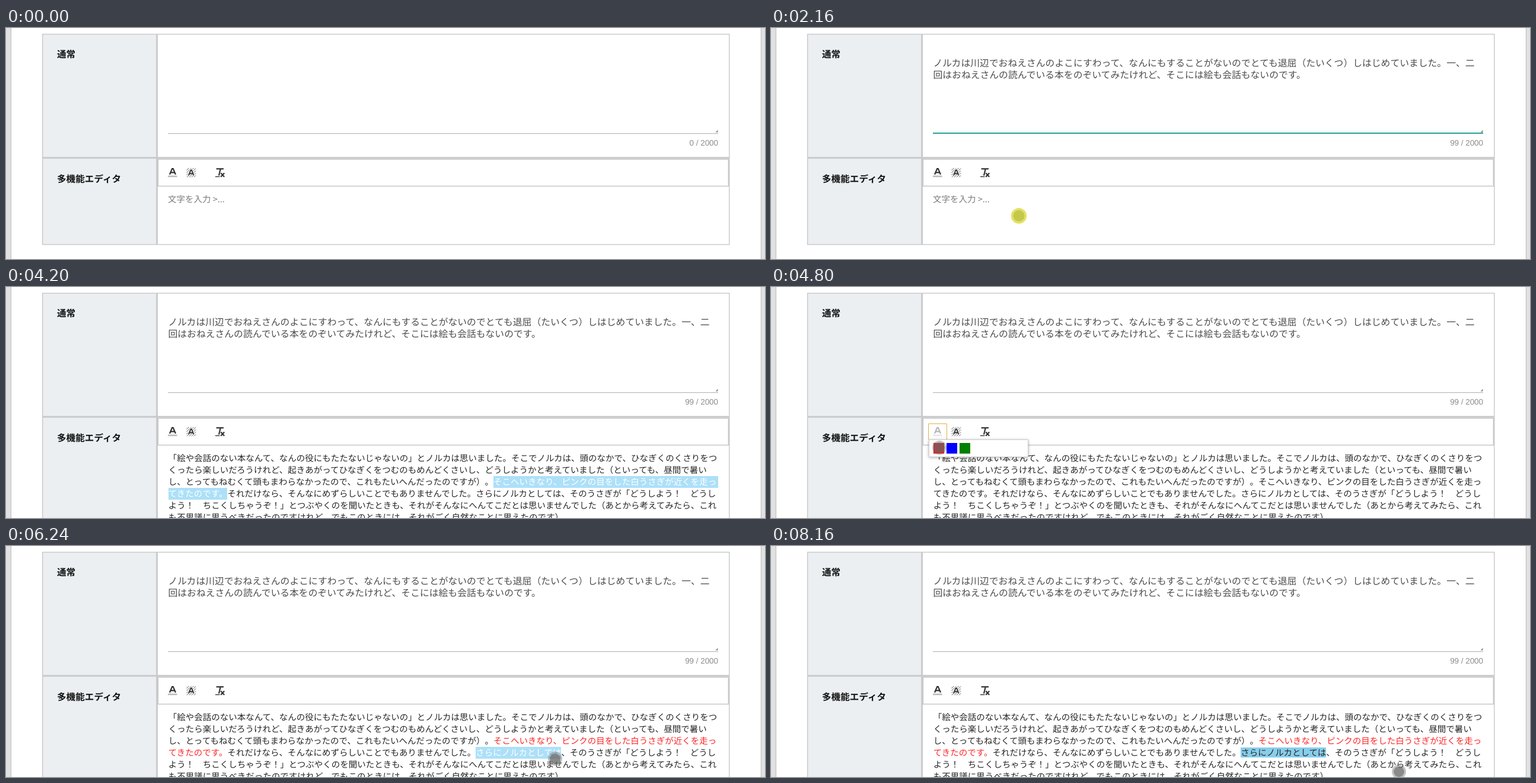
These frames come from a looping animation (1280 px wide and 391 px high, 8.28 s). An HTML page:

```html
<!DOCTYPE html>
<html lang="ja">
<head>
<meta charset="utf-8">
<title>Editor demo</title>
<style>
html, body { margin: 0; width: 100%; height: 100%; overflow: hidden; background: #fff; }
#stage {
  position: relative; width: 1280px; height: 391px; overflow: hidden;
  font-family: "Noto Sans CJK JP", "Noto Sans CJK", sans-serif; line-height: 20px;
  white-space: pre; text-spacing-trim: space-all; text-rendering: geometricPrecision;
}
#stage > * { position: absolute; }
svg, .popup { left: 0; top: 0; }
h2 { left: 86px; margin: 0; font-size: 15.6px; line-height: 20px; font-weight: 700; color: #111; }
#area { left: 273.5px; top: 49px; font-size: 15.8px; font-weight: 300; color: #4c4c4c; }
#count { right: 79px; top: 185px; font: 13.4px/20px "Liberation Sans", Arial, sans-serif; color: #8c8c8c; }
#hint, #doc { left: 273.8px; top: 280px; font-size: 14.51px; font-weight: 300; }
#hint { left: 273px; color: #7a7a7a; }
#doc { color: #262626; }
.red { color: #ff2424; }
.mark { background: linear-gradient(#87ceeb, #87ceeb) center / 100% 17px no-repeat; }
.sel { color: #fff; background: linear-gradient(#ade0f8, #ade0f8) center / 100% 20px no-repeat; }
.full { padding-right: 3px; }
.caret { width: 1px; height: 17px; background: #111; }
.popup * { position: absolute; box-sizing: border-box; }
.pick { top: 230.5px; width: 32px; height: 28px; border: 1.5px solid #e2ad45; border-radius: 1px; }
.menu { top: 258px; width: 168px; height: 30px; border: 1px solid #ccc; background: #fff;
  box-shadow: 0 1px 5px rgba(0,0,0,.3); }
.menu i { top: 5px; width: 18px; height: 18px; }
#dot { width: 18px; height: 18px; margin: -12px; border: 3px solid rgba(120,120,120,.45);
  border-radius: 50%; background: rgba(105,105,105,.78); background-clip: padding-box; }
#dot.click { width: 20px; height: 20px; margin: -13px; border-color: #e3e160; background-color: #c6c84b;
  box-shadow: 0 0 2px #eeee90; }
#pan { left: 874px; top: 359px; }
</style>
</head>
<body>
<div id="stage">
  <svg width="1280" height="391" viewBox="0 0 1280 391">
    <path fill="#e1e1e1" d="M0 0h8v391H0zM1274 0h6v391h-6z"/>
    <path stroke="#c6c6c6" stroke-width="1.4" d="M8.4 0v391M1273.5 0v391"/>
    <rect class="tall" x="61.6" y="10.5" width="193" height="356" fill="#ebeff2"/>
    <rect class="tall" x="61.6" y="10.5" width="1158.2" height="356" fill="none" stroke="#c6c7c9" stroke-width="1.4"/>
    <rect class="tall" x="253.2" y="10.5" width="2.8" height="356" fill="#c8cacc"/>
    <path stroke="#c8cacc" stroke-width="3" d="M61 219.8h1159"/>
    <rect x="256.4" y="222.2" width="962" height="45.4" fill="#fff" stroke="#c6c6c6" stroke-width="1.5"/>
    <path stroke="#bbb" stroke-width="1.3" d="M273 178.6h928"/>
    <path fill="#888" d="M1200.5 172.5v4h-4z"/>
    <path id="focus" stroke="#26a69a" stroke-width="2"/>
    <g id="iconA">
      <path fill="none" stroke="#333" stroke-width="2.2" d="M276 248l4.2-10h1.6l4.2 10M277.8 244.6h6.4"/>
      <path fill="#bbb" d="M273 249.8h15.6v2.6H273z"/>
    </g>
    <g id="iconB">
      <path fill="none" stroke="#555" stroke-width="1" d="M304.5 241l4-4M304.5 245l8-8M304.5 249l12-12M305 252.5l15-15M309 252.5l11-11M313 252.5l7-7M317 252.5l3-3"/>
      <path fill="none" stroke="#fff" stroke-width="4" d="M308 249.5l3.6-9h1.4l3.6 9"/>
      <path fill="none" stroke="#333" stroke-width="2" d="M308 249.5l3.6-9h1.4l3.6 9M309.6 246.4h5.4"/>
    </g>
    <path fill="none" stroke="#333" stroke-width="2.2" d="M354.6 238.3h12.4M361.8 238.3l-2.8 11.5M362.2 245.6l6 6.4M368.2 245.6l-6 6.4"/>
    <path stroke="#333" stroke-width="1.4" d="M353 251.6h7.5"/>
  </svg>
  <h2 style="top:34px">通常</h2>
  <h2 style="top:245px">多機能エディタ</h2>
  <div id="area">ノルカは川辺でおねえさんのよこにすわって、なんにもすることがないのでとても退屈（たいくつ）しはじめていました。一、二
回はおねえさんの読んでいる本をのぞいてみたけれど、そこには絵も会話もないのです。</div>
  <div id="count"></div>
  <div id="hint">文字を入力 &gt;...</div>
  <div id="doc">「絵や会話のない本なんて、なんの役にもたたないじゃないの」とノルカは思いました。そこでノルカは、頭のなかで、ひなぎくのくさりをつ
くったら楽しいだろうけれど、起きあがってひなぎくをつむのもめんどくさいし、どうしようかと考えていました（といっても、昼間で暑い
し、とってもねむくて頭もまわらなかったので、これもたいへんだったのですが）。<span id="tail">そこへいきなり、ピンクの目をした白うさぎが近くを走っ</span>
<span id="head">てきたのです。</span>それだけなら、そんなにめずらしいことでもありませんでした。<span id="phrase">さらにノルカとしては</span>、そのうさぎが「どうしよう！　どうし
よう！　ちこくしちゃうぞ！」とつぶやくのを聞いたときも、それがそんなにへんてこだとは思いませんでした（あとから考えてみたら、これ
も不思議に思うべきだったのですけれど、でもこのときには、それがごく自然なことに思えたのです）。</div>
  <div id="caret" class="caret"></div>
  <div id="menuA" class="popup"></div>
  <div id="menuB" class="popup"></div>
  <div id="dot"></div>
  <svg id="pan" width="20" height="20" viewBox="-10 -10 20 20">
    <path fill="#000" stroke="#fff" stroke-width=".7" d="M0-9l3.6 4H1.3v3.7H5v-2.3L9 0 5 3.6V1.3H1.3V5h2.3L0 9l-3.6-4h2.3V1.3H-5v2.3L-9 0l4-3.6v2.3h3.7V-5h-2.3z"/>
  </svg>
</div>
<script>
const LOOP = 8280, STEP = 120, CHAR = 14.5;
const $ = id => document.getElementById(id);
const within = (t, a, b) => t >= a && t < b;
const clamp = v => Math.max(0, Math.min(1, v));
const ease = v => v * v * (3 - 2 * v);
const show = (id, on) => { $(id).style.display = on ? '' : 'none'; };

// pointer stops per visible stretch: time, x, y
const paths = [
  [[120, 632, 97], [1200, 632, 97]],
  [[1440, 419, 356], [1920, 418, 318], [2520, 418, 318]],
  [[3360, 884, 369], [3480, 835, 342], [3840, 1187, 338], [3960, 700, 358], [4200, 376, 379]],
  [[4320, 281, 248], [4560, 281, 248], [4800, 284, 272], [4920, 284, 272], [5280, 784, 354],
   [5520, 797, 360], [6120, 927, 360], [6360, 924, 360], [6720, 312, 248], [6960, 374, 271],
   [7200, 372, 271], [7560, 1076, 354], [7800, 1059, 382], [8280, 1059, 382]]
];
// caret: from, to, x, y
const carets = [
  [240, 600, 273, 51], [600, 960, 273, 91], [1440, 1920, 273, 91], [2400, 2640, 273, 282],
  [5160, 5520, 779, 343], [7560, 7800, 1082, 343], [8040, 8160, 1082, 343]
];

function buildMenu(id, x, colors) {
  const swatches = colors.map((c, i) => `<i style="left:${7 + i * 22.2}px;background:${c}"></i>`).join('');
  $(id).innerHTML = `<div class="pick" style="left:${x - 1.5}px"></div>` +
    `<div class="menu" style="left:${x}px">${swatches}</div>`;
}
buildMenu('menuA', 266, ['red', 'blue', 'green']);
buildMenu('menuB', 298, ['yellow', 'pink', 'skyblue']);

const texts = {};
for (const id of ['tail', 'head', 'phrase']) {
  texts[id] = $(id).textContent;
  $(id).innerHTML = '<span></span><span></span>';
}

function select(id, n) {
  const [on, off] = $(id).children, s = texts[id];
  n = Math.max(0, Math.min(s.length, Math.round(n)));
  on.className = n ? 'sel' + (id === 'tail' && n === s.length ? ' full' : '') : '';
  on.textContent = s.slice(0, n);
  off.textContent = s.slice(n);
}

function pointer(t) {
  const p = paths.find(q => within(t, q[0][0], q[q.length - 1][0]));
  if (!p) return null;
  const i = p.findIndex(k => k[0] > t), [a, b] = [p[i - 1], p[i]];
  const k = ease((t - a[0]) / (b[0] - a[0]));
  return { x: a[1] + (b[1] - a[1]) * k, y: a[2] + (b[2] - a[2]) * k };
}

function render(t) {
  const filled = t >= 600, grown = t >= 2640;
  show('area', filled);
  $('count').textContent = (filled ? 99 : 0) + ' / 2000';
  show('hint', !grown);
  show('doc', grown);
  for (const r of document.querySelectorAll('.tall')) r.setAttribute('height', grown ? 420 : 356);

  const half = 464 * ease(clamp((t - 60) / 300) - clamp((t - 2220) / 300));
  show('focus', half > 0);
  $('focus').setAttribute('d', `M${737 - half} 178h${2 * half}`);

  const p = pointer(t);
  const held = within(t, 3480, 4440);
  select('tail', !held ? 0 : t < 3960 ? (p.x - 823) / CHAR : 26);
  select('head', held && t >= 3960 ? 7 : 0);
  select('phrase', within(t, 5640, 6720) ? (t < 6120 ? (p.x + 12 - 794) / CHAR : 10) : 0);
  for (const id of ['tail', 'head']) $(id).className = t >= 4920 ? 'red' : '';
  $('phrase').className = t >= 7200 ? 'mark' : '';

  const openA = within(t, 4440, 4920), openB = within(t, 6720, 7200);
  show('menuA', openA);
  show('menuB', openB);
  $('iconA').style.opacity = openA ? .35 : 1;
  $('iconB').style.opacity = openB ? .35 : 1;

  const c = carets.find(k => within(t, k[0], k[1]));
  show('caret', c);
  if (c) Object.assign($('caret').style, { left: c[2] + 'px', top: c[3] + 'px' });

  show('dot', p);
  if (p) {
    const fade = t < 1200 ? Math.min(1, t / 240, (1200 - t) / 360) : t < 2520 ? Math.min(1, (2520 - t) / 240) : 1;
    Object.assign($('dot').style, { left: p.x + 'px', top: p.y + 'px', opacity: fade });
    $('dot').className = t < 1200 || within(t, 1920, 2520) ? 'click' : '';
  }
  show('pan', within(t, 3000, 3360));
}

const start = performance.now();
function tick() {
  const t = (performance.now() - start) % LOOP;
  render(Math.floor(t / STEP) * STEP);
  requestAnimationFrame(tick);
}
tick();
</script>
</body>
</html>
```
